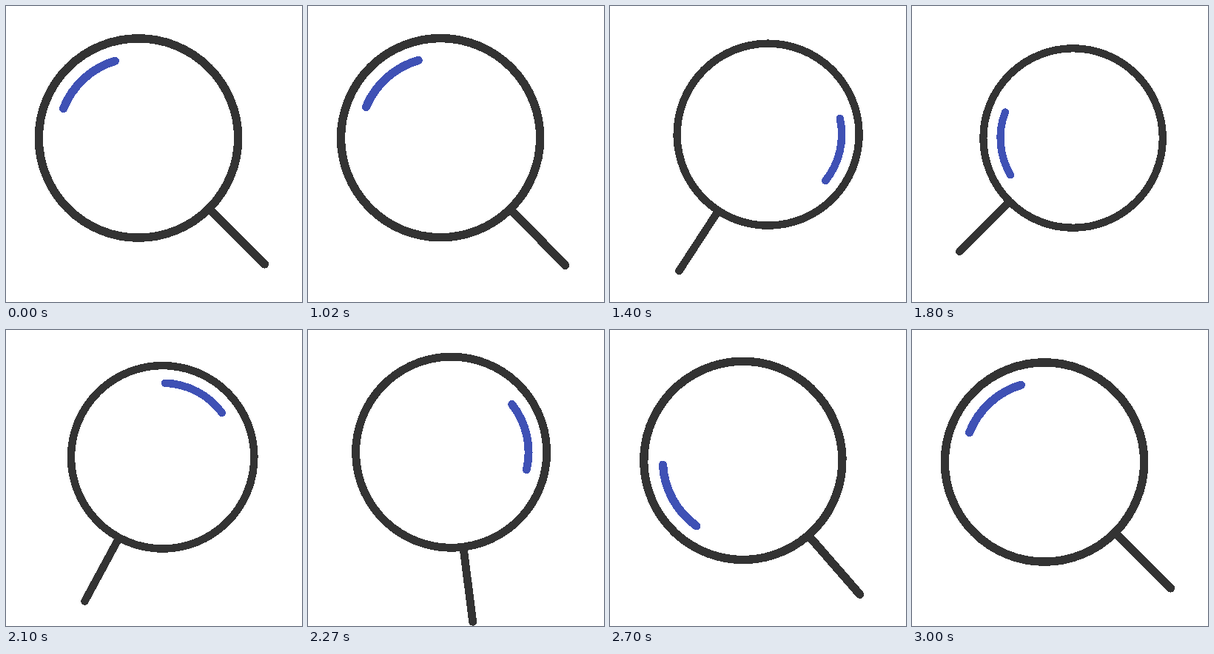
Write an HTML page that moves like this. It is 400 px wide and 400 px high and loops after 3.02 s.

```html
<!DOCTYPE html>
<html lang="en">
<head>
<meta charset="utf-8">
<title>Magnifying glass</title>
<style>
  html, body { margin: 0; height: 100%; overflow: hidden; background: #fff; }
  svg { display: block; width: 100%; height: 100%; shape-rendering: crispEdges; }
  path, circle { fill: none; stroke: #333; stroke-width: 11.4; }
  path { stroke-linecap: round; }
  #shine { stroke: #3f51b5; }
</style>
</head>
<body>
<svg viewBox="0 0 400 400">
  <g id="glass">
    <path id="handle"/>
    <circle r="134.7"/>
    <path id="shine"/>
  </g>
</svg>
<script>
const LOOP = 3020, STEP = 25;
const [glass, handle, shine] = ['glass', 'handle', 'shine'].map(id => document.getElementById(id));

const polar = (r, deg) => {
  const a = deg * Math.PI / 180;
  return `${r * Math.cos(a)} ${r * Math.sin(a)}`;
};
handle.setAttribute('d', `M${polar(137, 45)}L${polar(241, 45)}`);
shine.setAttribute('d', `M${polar(109, 201.6)}A109 109 0 0 1 ${polar(109, 253)}`);

// Cubic easing with flat ends, running from start to end; x1 and x2 set the handles
function ease(t, start, end, x1, x2) {
  const x = Math.min(1, Math.max(0, (t - start) / (end - start)));
  let lo = 0, hi = 1;
  for (let i = 0; i < 30; i++) {
    const p = (lo + hi) / 2, q = 1 - p;
    if (3 * p * q * q * x1 + 3 * p * p * q * x2 + p * p * p < x) lo = p;
    else hi = p;
  }
  return lo * lo * (3 - 2 * lo);
}

function draw(t) {
  const swing = ease(t, 1000, 1518, .333, .667) - ease(t, 1885, 3000, .333, .17);
  const bow = swing * (1 - swing);
  const x = 179 + 38.6 * swing + bow * (36 * swing - 21.5);
  const y = 178.5 - bow * (50 + 30 * swing - 45 * swing * swing);
  glass.setAttribute('transform',
    `translate(${x} ${y}) rotate(${90 * swing}) scale(${1 - .1 * swing})`);
  shine.setAttribute('transform', `rotate(${720 * ease(t, 1000, 3000, .327, .815)})`);
}

const begin = performance.now();
function tick() {
  const t = (performance.now() - begin) % LOOP;
  draw(Math.floor((t + 5) / STEP) * STEP);
  requestAnimationFrame(tick);
}
tick();
</script>
</body>
</html>
```
